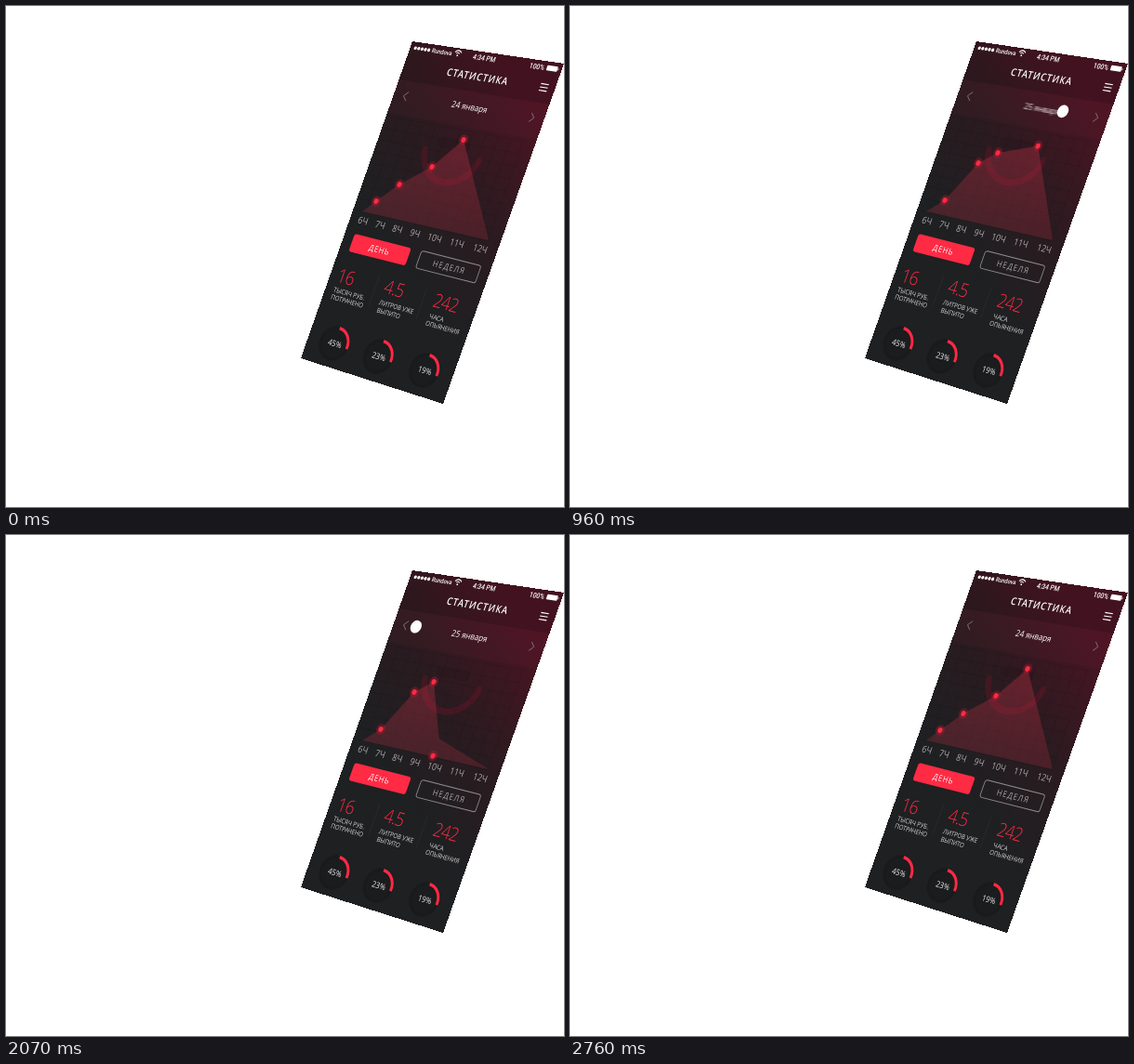
These frames come from a looping animation (600 px wide and 539 px high, 2790 ms). An HTML page:

```html
<!DOCTYPE html>
<html lang="ru">
<head>
<meta charset="utf-8">
<title>Статистика</title>
<style>
html, body { margin: 0; width: 100%; height: 100%; overflow: hidden; background: #fff; }
svg { display: block; width: 600px; height: 539px; }
text { font-family: "Open Sans", "Noto Sans", sans-serif; text-anchor: middle; }
.bar { font-family: Roboto, "Liberation Sans", sans-serif; font-weight: 500; }
</style>
</head>
<body>
<svg viewBox="0 0 600 539">
  <defs>
    <linearGradient id="glow" gradientUnits="userSpaceOnUse" x1="395" y1="235" x2="575" y2="115">
      <stop offset="0" stop-color="#1e2022"/>
      <stop offset=".45" stop-color="#2a1b20"/>
      <stop offset="1" stop-color="#4a1423"/>
    </linearGradient>
    <linearGradient id="heat" gradientUnits="userSpaceOnUse" x1="0" y1="144" x2="0" y2="250">
      <stop offset="0" stop-color="#d2324a" stop-opacity=".34"/>
      <stop offset="1" stop-color="#d2324a" stop-opacity=".2"/>
    </linearGradient>
    <filter id="smear" x="-30%" y="-30%" width="160%" height="160%"><feGaussianBlur stdDeviation="0 0"/></filter>
    <clipPath id="screen"><path d="M437 38L600 62L470 428L317 379Z"/></clipPath>
  </defs>
  <path d="M437 38L600 62L470 428L317 379Z" fill="url(#glow)" shape-rendering="crispEdges"/>
  <g id="stage" clip-path="url(#screen)"></g>
</svg>
<script>
const LOOP = 2790, RED = '#ff2a44';
const stage = document.getElementById('stage');

function add(tag, attrs, parent = stage) {
  const el = document.createElementNS('http://www.w3.org/2000/svg', tag);
  for (const k in attrs) el.setAttribute(k, attrs[k]);
  return parent.appendChild(el);
}

// Slope of the screen's horizontal lines at a stage point.
function slope(x, y) {
  let s = .2;
  for (let i = 0; i < 6; i++) {
    const t = (y - 38 - s * (x - 437)) / (341 + 120 * s);
    s = .147 + .173 * t;
  }
  return s;
}
const tilt = (x, y) => `matrix(1 ${slope(x, y).toFixed(4)} -.42 1.19 ${x} ${y})`;
const at = (x, y, parent) => add('g', { transform: tilt(x, y) }, parent);

function label(str, x, y, size, fill = '#fff', more = {}) {
  const el = add('text', { y: size * .357, 'font-size': size, fill, ...more }, at(x, y));
  el.textContent = str;
  return el.parentNode;
}

// Points on the left and right screen edges.
const left = t => [437 - 120 * t, 38 + 341 * t];
const right = t => [600 - 130 * t, 62 + 366 * t];
const mix = (a, b, p) => [a[0] + (b[0] - a[0]) * p, a[1] + (b[1] - a[1]) * p];
const poly = pts => 'M' + pts.map(p => p.map(n => n.toFixed(2)).join(' ')).join('L');
const band = (a, b, fill) => add('path', { d: poly([left(a), right(a), right(b), left(b)]) + 'Z', fill });

// Header
band(0, .12, 'rgba(0,0,0,.09)');
band(.12, .225, 'rgba(255,60,90,.03)');
for (let i = 0; i < 5; i++) add('circle', { r: 1.5, fill: '#fff' }, at(440.2 + 3.6 * i, 45.2 + .55 * i));
const bar = { class: 'bar' };
label('Rundova', 468.8, 49.3, 5.5, '#fff', bar);
const wifi = at(485.5, 52.5);
for (const r of [1.6, 3.4])
  add('path', { d: `M${-r} ${-r * .6}A${r * 1.2} ${r * 1.2} 0 0 1 ${r} ${-r * .6}`, fill: 'none', stroke: '#fff', 'stroke-width': .9 }, wifi);
add('circle', { r: .8, cy: .6, fill: '#fff' }, wifi);
label('4:34 PM', 514.3, 56, 6.5, '#fff', bar);
label('100%', 571, 65, 6.6, '#fff', bar);
const battery = at(587.5, 67.3);
add('rect', { x: -6, y: -2.3, width: 11.5, height: 4.6, rx: .8, fill: '#fff' }, battery);
add('rect', { x: 6, y: -.8, width: .8, height: 1.6, fill: '#fff' }, battery);
label('СТАТИСТИКА', 507.3, 76, 9, '#fff', { 'letter-spacing': .85, 'font-weight': 600 });
const menu = at(578.3, 87.6);
for (const y of [-3, 0, 3]) add('path', { d: `M-4.2 ${y}h8.4`, stroke: '#fff', 'stroke-width': .9 }, menu);
for (const [x, y, d] of [[429.5, 97, 1], [565.7, 120, -1]])
  add('path', { d: `M${2 * d} -4L${-2 * d} 0L${2 * d} 4`, fill: 'none', stroke: '#8a7a81', 'stroke-width': .7 }, at(x, y));

// Chart backdrop
const top0 = .235, base0 = .53;
const gridLine = (a, b) => add('path', { d: poly([a, b]), stroke: '#000', 'stroke-opacity': .16, 'stroke-width': .7 });
for (let i = 0; i <= 12; i++)
  gridLine(mix(left(top0), right(top0), i / 12), mix(left(base0), right(base0), i / 12));
for (let i = 0; i <= 8; i++) {
  const t = top0 + (base0 - top0) * i / 8;
  gridLine(left(t), mix(left(t), right(t), .93));
}
add('path', { d: 'M-29 -4A29 27 0 0 0 29 -4', fill: 'none', stroke: '#c01030', 'stroke-opacity': .17, 'stroke-width': 6 }, at(479, 162));
add('rect', { x: -18, y: -5, width: 36, height: 10, rx: 5, fill: '#000', opacity: .07 }, at(481, 149));

const area = add('path', { fill: 'url(#heat)' });
const dots = [0, 1, 2, 3].map(() => {
  const g = add('g', {});
  add('circle', { r: 4.7, fill: '#c01830', opacity: .36 }, g);
  add('circle', { r: 2.4, fill: RED }, g);
  return g;
});

// Hours
[[384, 231], [402.5, 235.5], [421, 240], [440, 244.5], [461, 249.5], [485, 255], [510, 261]]
  .forEach(([x, y], i) => label(i + 6 + 'Ч', x, y, 8.2, '#b0aaad'));

// Buttons
add('rect', { x: -30.4, y: -7.9, width: 60.8, height: 15.8, rx: 2.2, fill: RED }, at(402.1, 262.2));
label('ДЕНЬ', 401.5, 262.3, 7.2, '#fff', { 'letter-spacing': .7 });
add('rect', { x: -32, y: -7.8, width: 64, height: 15.6, rx: 2.2, fill: 'none', stroke: '#8e8b8d', 'stroke-width': .8 }, at(475.7, 280.7));
label('НЕДЕЛЯ', 476.5, 281, 7.4, '#a9a7a8', { 'letter-spacing': 1 });

// Totals
const light = { 'font-weight': 300, 'letter-spacing': -.9 };
for (const [x, y] of [[396, 306], [447, 320]]) add('path', { d: 'M0 -14V14', stroke: '#fff', 'stroke-opacity': .04 }, at(x, y));
label('16', 365.5, 291.5, 16.5, RED, light);
label('4.5', 417.5, 304, 16.5, RED, light);
label('242', 473, 319.5, 16.5, RED, light);
[['ТЫСЯЧ РУБ.', 369, 309.5], ['ПОТРАЧЕНО', 366.8, 317.5], ['ЛИТРОВ УЖЕ', 419.8, 323.7],
 ['ВЫПИТО', 411.3, 330.5], ['ЧАСА', 463, 335.5], ['ОПЬЯНЕНИЯ', 469.3, 346]]
  .forEach(([s, x, y]) => label(s, x, y, 5.8, '#d6d6d7'));

// Rings
[['45%', 353, 363], ['23%', 400.3, 377], ['19%', 449.8, 392]].forEach(([s, x, y]) => {
  const g = at(x, y);
  add('circle', { r: 13.8, fill: '#1b1c1e', stroke: '#191a1c', 'stroke-width': 2.8 }, g);
  add('path', { d: 'M0 -13.8A13.8 13.8 0 0 1 13.7 1.6', fill: 'none', stroke: RED, 'stroke-width': 2.7 }, g);
  label(s, x + .6, y, 7.2, '#eee');
});

// Moving date labels and touch marker
const days = ['24 января', '25 января'].map(s => label(s, 498.5, 108.5, 7.8));
const smear = document.querySelector('#smear feGaussianBlur');
const touch = add('g', {});
add('circle', { r: 5.7, fill: '#fff' }, touch);

const day24 = [[398, 210], [423, 192], [458, 173], [492, 144]];
const day25 = [[403, 209], [439, 169], [460, 158], [505, 147]];
const ground = [[393.3, 223.4], [411, 226], [436.5, 234], [459, 237.7]];
// Per point: fall start, fall end, rise start, rise end
const forth = [0, 1, 2, 3].map(i => [275, 450, 450, 625].map(v => v + 120 * i));
const back = [[2420, 2530, 2560, 2740], [2225, 2310, 2500, 2680], [2110, 2210, 2260, 2445], [1980, 2070, 2100, 2290]];

const ramp = (t, a, b) => Math.min(1, Math.max(0, (t - a) / (b - a)));
const quad = x => x < .5 ? 2 * x * x : 1 - 2 * (1 - x) ** 2;
const cubic = x => x < .5 ? 4 * x ** 3 : 1 - 4 * (1 - x) ** 3;

// lift keeps the lowest pose a share of the way towards the next value.
function point(i, t, lift = 0) {
  const home = t > 1400;
  const [a, b, c, d] = (home ? back : forth)[i];
  const [from, to] = home ? [day25, day24] : [day24, day25];
  const low = mix(ground[i], to[i], lift);
  return t < c ? mix(from[i], low, quad(ramp(t, a, b))) : mix(low, to[i], quad(ramp(t, c, d)));
}

function placeDay(el, dx, alpha, moving) {
  el.setAttribute('transform', tilt(498.5 + dx, 108.5 + dx * .175));
  el.setAttribute('opacity', alpha);
  if (moving) el.setAttribute('filter', 'url(#smear)');
  else el.removeAttribute('filter');
}

function draw(t) {
  const home = t > 1400;
  const line = [0, 1, 2, 3].map(i => point(i, t, home ? .2 : .07));
  area.setAttribute('d', poly([[383, 221], ...line, [519, 252]]) + 'Z');
  dots.forEach((g, i) => g.setAttribute('transform', tilt(...point(i, t))));

  const x = home ? ramp(t, 2130, 2760) : ramp(t, 570, 1110);
  const p = cubic(x), moving = x > 0 && x < 1;
  const [out, enter] = home ? [days[1], days[0]] : days;
  const dir = home ? 1 : -1;
  const fast = Math.sin(Math.PI * x);
  smear.setAttribute('stdDeviation', `${(1.7 * fast).toFixed(2)} ${(.25 * fast).toFixed(2)}`);
  placeDay(out, dir * 110 * p, x < 1 ? 1 - .6 * p : 0, moving);
  placeDay(enter, -dir * (home ? 80 : 110) * (1 - p), x > 0 ? Math.min(1, .25 + p) : 0, moving);

  const spot = home
    ? mix([430, 97], [465, 102.5], quad(ramp(t, 1815, 2463)))
    : mix([565, 119], [530, 113.3], quad(ramp(t, 570, 930)));
  touch.setAttribute('transform', tilt(...spot));
  touch.setAttribute('opacity', home
    ? ramp(t, 1410, 1640) * (1 - ramp(t, 2550, 2760))
    : ramp(t, 30, 260) * (1 - ramp(t, 1110, 1260)));
}

const start = performance.now();
function tick() {
  const t = (performance.now() - start) % LOOP;
  draw(Math.floor(t / 30) * 30);
  requestAnimationFrame(tick);
}
tick();
</script>
</body>
</html>
```
